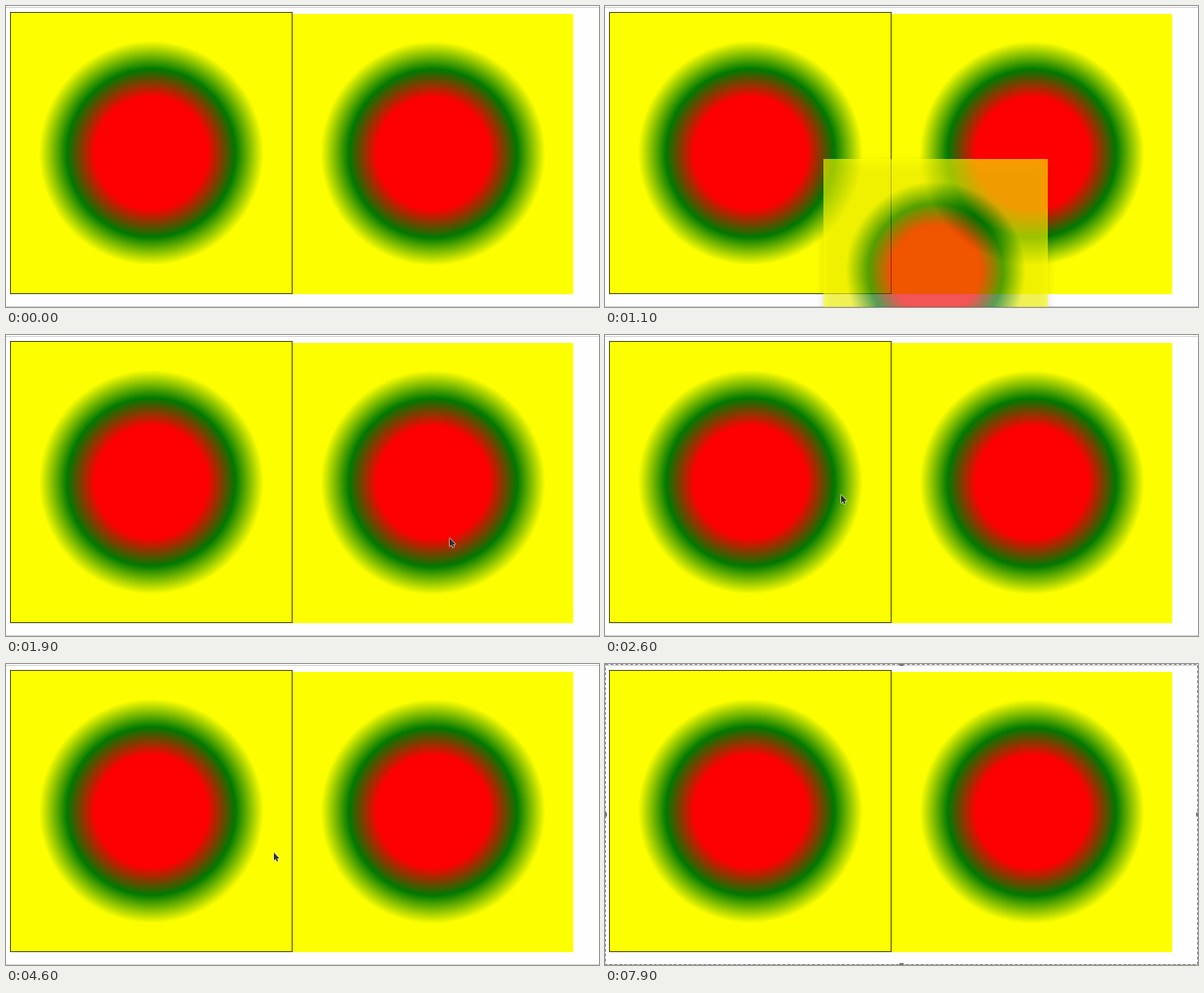
Write an HTML page with a canvas that moves like this. It is 600 px wide and 305 px high and loops after 8000 ms.

```html
<!DOCTYPE html>
<html lang="en">
<head>
<meta charset="utf-8">
<title>Dragging a gradient image</title>
<style>
  html, body { margin: 0; width: 100%; height: 100%; overflow: hidden; background: #fff; }
  canvas { display: block; width: 600px; height: 305px; }
</style>
</head>
<body>
<canvas id="stage" width="600" height="305"></canvas>
<script>
const W = 600, H = 305, LOOP = 8000, STEP = 100;
const SIZE = 284, GHOST = SIZE * 0.8;
const GRAB = { x: 160, y: 181 };
const POINTER_IN = 100, DRAG_START = 400, DRAG_END = 1800, SELECTED = 6800;

const ctx = document.getElementById('stage').getContext('2d');

// Turning points of the pointer tip; the moves between them are eased
const turns = [
  { t: 100, x: 430, y: 130 },
  { t: 400, x: 490, y: 233 },
  { t: 800, x: 490, y: 295 },
  { t: 1300, x: 323, y: 358 },
  { t: 1900, x: 449, y: 206 },
  { t: 2200, x: 563, y: 182 },
  { t: 2600, x: 239, y: 162 },
  { t: 3600, x: 141, y: 215 },
  { t: 4200, x: 441, y: 258 },
  { t: 4600, x: 271, y: 191 },
  { t: 5000, x: 506, y: 258 },
  { t: 5400, x: 346, y: 208 }
];

const ease = k => (1 - Math.cos(Math.PI * k)) / 2;

function pointerAt(t) {
  const i = turns.findIndex(p => p.t > t);
  if (i < 0) return turns.at(-1);
  const a = turns[i - 1], b = turns[i];
  const k = ease((t - a.t) / (b.t - a.t));
  return {
    x: Math.round(a.x + (b.x - a.x) * k),
    y: Math.round(a.y + (b.y - a.y) * k)
  };
}

function makeDisc() {
  const disc = document.createElement('canvas');
  disc.width = disc.height = SIZE;
  const c = disc.getContext('2d');
  const mid = SIZE / 2;
  const g = c.createRadialGradient(mid, mid, SIZE * 0.2, mid, mid, SIZE * 0.4);
  g.addColorStop(0, '#ff0000');
  g.addColorStop(0.5, '#007900');
  g.addColorStop(1, '#fdff00');
  c.fillStyle = g;
  c.fillRect(0, 0, SIZE, SIZE);
  return disc;
}
const disc = makeDisc();

function drawPage() {
  ctx.fillStyle = '#fefefe';
  ctx.fillRect(0, 0, W, H);
  ctx.fillStyle = '#d8d8d8';
  ctx.fillRect(0, 1, W, 1);
  ctx.fillRect(0, 304, W, 1);
  ctx.drawImage(disc, 290, 7.5);
  ctx.drawImage(disc, 5, 7);
  ctx.strokeStyle = '#5c5c20';
  ctx.lineWidth = 1;
  ctx.strokeRect(4.5, 6.5, 285, 285);
}

function drawGhost(x, y) {
  // Cast only the shadow: the rectangle itself lies off stage
  ctx.save();
  ctx.shadowColor = 'rgba(0,0,0,0.14)';
  ctx.shadowBlur = 9;
  ctx.shadowOffsetX = 2000;
  ctx.shadowOffsetY = 3;
  ctx.fillRect(x - 2000, y, GHOST, GHOST);
  ctx.restore();

  ctx.globalAlpha = 0.61;
  ctx.drawImage(disc, x, y, GHOST, GHOST);
  ctx.globalAlpha = 1;
}

const arrow = new Path2D('M0 0V8L1.8 6.4L3 9.2L4.4 8.6L3.2 5.9H5.6Z');

function drawPointer({ x, y }) {
  ctx.save();
  ctx.translate(x, y);
  ctx.lineJoin = 'round';
  ctx.lineWidth = 1.4;
  ctx.strokeStyle = 'rgba(255,255,255,0.6)';
  ctx.fillStyle = '#283030';
  ctx.stroke(arrow);
  ctx.fill(arrow);
  ctx.restore();
}

function drawSelection() {
  ctx.strokeStyle = '#8c8c8c';
  ctx.lineWidth = 1;
  ctx.setLineDash([3, 2]);
  ctx.strokeRect(0.5, 0.5, W - 1, H - 1);
  ctx.setLineDash([]);
  ctx.fillStyle = '#777';
  for (const [x, y] of [[W / 2, 0], [W / 2, H], [0, H / 2], [W, H / 2]]) {
    ctx.fillRect(x - 2, y - 2, 4, 4);
  }
}

function draw(t) {
  drawPage();
  if (t >= SELECTED) return drawSelection();
  if (t < POINTER_IN) return;
  const tip = pointerAt(t);
  if (t >= DRAG_START && t < DRAG_END) drawGhost(tip.x - GRAB.x, tip.y - GRAB.y);
  drawPointer(tip);
}

const start = performance.now();
function tick() {
  const t = (performance.now() - start) % LOOP;
  draw(Math.floor(t / STEP) * STEP);
  requestAnimationFrame(tick);
}
tick();
</script>
</body>
</html>
```
